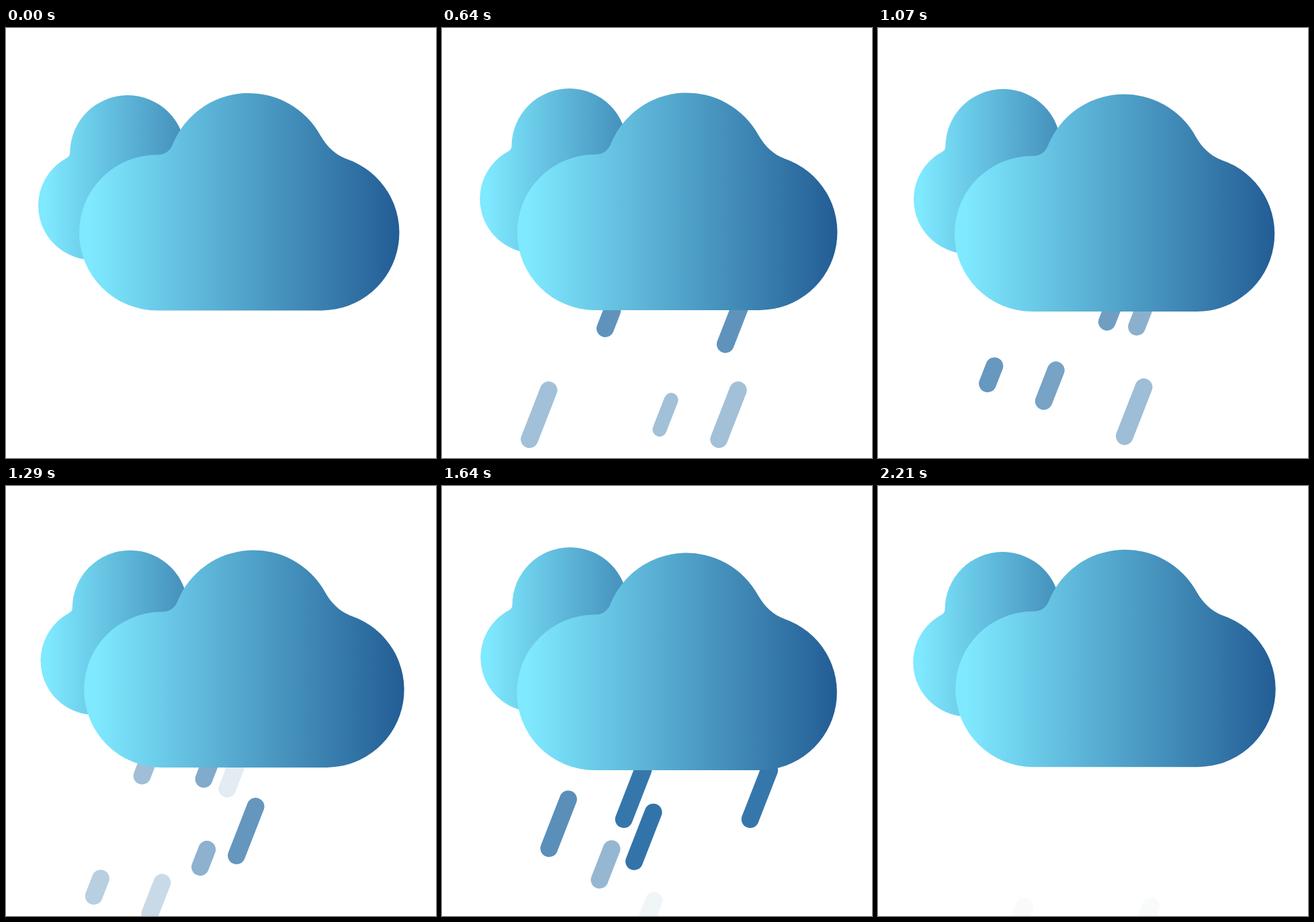
Write an HTML page that moves like this. It is 640 px wide and 640 px high and loops after 2.43 s.

```html
<!DOCTYPE html>
<html lang="en">
<head>
<meta charset="utf-8">
<title>Rain clouds</title>
<style>
  html, body { margin: 0; width: 100%; height: 100%; overflow: hidden; background: #fff; }
  svg { display: block; width: 100vw; height: 100vh; }
  #rain { stroke: #3274a9; stroke-linecap: round; }
</style>
</head>
<body>
<svg viewBox="0 0 640 640">
  <defs>
    <linearGradient id="backFill" gradientUnits="userSpaceOnUse" x1="58" x2="381">
      <stop stop-color="#7fe9ff"/><stop offset="1" stop-color="#235d95"/>
    </linearGradient>
    <linearGradient id="frontFill" gradientUnits="userSpaceOnUse" x1="125" x2="584">
      <stop stop-color="#7fe9ff"/><stop offset="1" stop-color="#235d95"/>
    </linearGradient>
  </defs>
  <path id="back" fill="url(#backFill)" d="M128.5 345A80.5 80.5 0 0 1 90 193.8Q95.2 191 95.2 186A85.9 85.9 0 0 1 267 186V345Z"/>
  <g id="rain"></g>
  <path id="front" fill="url(#frontFill)" d="M224.8 420.4A115.8 115.8 0 0 1 224.8 188.8C236 189 244.5 183 248.2 173A122 122 0 0 1 468.5 160.8C478 177 490 188.5 507 195A115.8 115.8 0 0 1 470 420.4Z"/>
</svg>
<script>
const LOOP = 2430, LAST = 31, FPS = 14, TICK = 40;
const RISE = 9.2, LIFE = 24.4, FALL = 13.5, SLANT = 0.4;
const BEAT = 8; // ticks between wobble points

const clouds = [
  { node: document.getElementById("front"),
    dx: [0, 5.2, 3, 3.2, 7.4, 2.5, 4.5, 6.3], dy: [0, -6.2, -0.5, 3.2, -1.6, 2.6, 1, -2.2] },
  { node: document.getElementById("back"),
    dx: [0, 6, 8.4, 6.8, 3.2, 9.2, 8, 4.3], dy: [0, -4.6, -10, -11.9, -4.4, -8.8, -6, -2] }
];

const kind = (height, width = 26) => ({ height, width });
const LONG = kind(73), MID = kind(46), SHORT = kind(26), THIN = kind(44, 21);
const laneX = lane => 239.5 + 47 * lane;
const drops = [];

// Drops of one shower leave together, each from its own lane
function shower(born, speed, lanes, startY = 338) {
  for (const [lane, { height, width }] of Object.entries(lanes)) {
    const line = document.createElementNS("http://www.w3.org/2000/svg", "line");
    const lean = height * 0.39 / 2, x = laneX(lane);
    const attrs = { x1: x - lean, y1: startY + height / 2, x2: x + lean, y2: startY - height / 2, "stroke-width": width };
    for (const name in attrs) line.setAttribute(name, attrs[name]);
    document.getElementById("rain").append(line);
    drops.push({ line, born, speed });
  }
}

shower(-1.6, 1, { 0: LONG, 4: THIN, 6: LONG });
shower(12, 1.78, { 1: SHORT, 5: LONG });
shower(12.6, 1, { 2: MID });
shower(13.8, 1, { 0: SHORT });
shower(17.3, 1.78, { 5: LONG });
shower(23, 1.3, { 4: LONG });
shower(23, 1.6, { 3: SHORT });
shower(28.8, 1, { 0: LONG });
shower(29, 1.39, { 2: MID });
shower(31.8, 1, { 2.35: LONG }, 398);
shower(32, 1, { 2: LONG, 6: LONG });

const startOf = step => 10 * Math.round(step * 100 / FPS);

const place = (node, x, y) => node.setAttribute("transform", `translate(${x.toFixed(2)} ${y.toFixed(2)})`);

// Smooth curve through evenly spaced values
function wobble(values, tick) {
  const last = values.length - 1;
  const i = Math.min(Math.floor(tick / BEAT), last - 1);
  const p = tick / BEAT - i, q = 1 - p;
  const slope = j => (values[Math.min(j + 1, last)] - values[Math.max(j - 1, 0)]) / 2;
  return q * q * (1 + 2 * p) * values[i] + p * p * (3 - 2 * p) * values[i + 1]
    + p * q * q * slope(i) - p * p * q * slope(i + 1);
}

function draw(time) {
  let step = Math.min(LAST, Math.floor((time + 5) * FPS / 1000));
  if (startOf(step) > time) step--;
  const tick = Math.ceil(startOf(step) / TICK);

  for (const { node, dx, dy } of clouds) place(node, wobble(dx, tick), wobble(dy, tick));
  for (const { line, born, speed } of drops) {
    const age = (tick - born) * speed;
    const alpha = Math.min(age / RISE, (LIFE - age) / (LIFE - RISE), 1);
    line.setAttribute("opacity", Math.max(0, alpha).toFixed(3));
    place(line, -age * FALL * SLANT, age * FALL);
  }
}

const begin = performance.now();
function loop() {
  draw((performance.now() - begin) % LOOP);
  requestAnimationFrame(loop);
}
draw(0);
requestAnimationFrame(loop);
</script>
</body>
</html>
```
